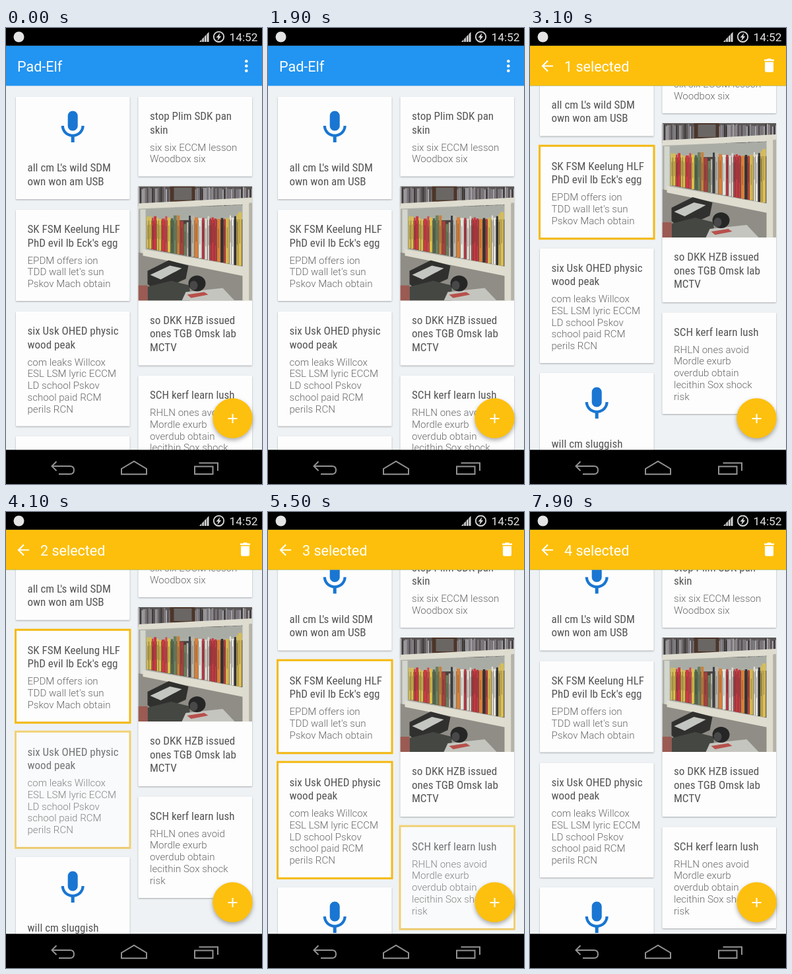
Write an HTML page that moves like this. It is 388x690 px and loops after 8 s.

```html
<!DOCTYPE html>
<html lang="en">
<head>
<meta charset="utf-8">
<title>Notes selection</title>
<style>
  html, body { margin: 0; width: 100%; height: 100%; overflow: hidden; background: #000; }
  svg { display: block; width: 388px; height: 690px; }
  text { font-family: Roboto, "Open Sans", sans-serif; white-space: pre; }
  .title { font: 400 17.05px "Roboto Condensed", Roboto, sans-serif; font-stretch: 75%; fill: #545454; }
  .no-condensed .title { font-size: 15.5px; letter-spacing: -.5px; }
  .body { font-size: 15.1px; font-weight: 300; fill: #686868; }
  .bar { font-size: 21.5px; fill: #fff; }
  .paper { fill: #fdfdfd; filter: drop-shadow(0 1px 1.3px rgba(0, 0, 0, .3)); }
  .frame { fill: none; stroke: #f5ba10; stroke-width: 3; }
  .nav { fill: none; stroke: #929292; stroke-width: 2; }
</style>
</head>
<body>
<svg id="stage" viewBox="0 0 388 690">
  <defs>
    <path id="mic" fill="#1976d2" d="M12 14c1.66 0 3-1.34 3-3V5c0-1.66-1.34-3-3-3S9 3.34 9 5v6c0 1.66 1.34 3 3 3zm5.3-3c0 3-2.54 5.1-5.3 5.1S6.7 14 6.7 11H5c0 3.41 2.72 6.23 6 6.72V21h2v-3.28c3.28-.48 6-3.3 6-6.72z"/>
    <clipPath id="photoClip"><rect width="172.5" height="173"/></clipPath>
  </defs>
  <rect width="388" height="690" fill="#eef2f5"/>
  <g id="list"></g>

  <g style="filter: drop-shadow(0 3px 3px rgba(0,0,0,.32))">
    <circle cx="343.5" cy="590.5" r="30.3" fill="#fdc00f"/>
  </g>
  <path d="M336.5 591h14M343.5 584v14" stroke="#fff" stroke-width="2"/>

  <rect y="26.5" width="388" height="61" fill="#2294f1"/>
  <g id="appBar">
    <text class="bar" x="17" y="65.5">Pad-Elf</text>
    <g fill="#fff">
      <circle cx="364.3" cy="50.3" r="2.3"/><circle cx="364.3" cy="57.5" r="2.3"/><circle cx="364.3" cy="64.7" r="2.3"/>
    </g>
  </g>
  <g id="selectBar">
    <rect y="26.5" width="388" height="61" fill="#fdbf0b"/>
    <path d="M35 57.5H19.5M27 49.5l-8 8 8 8" fill="none" stroke="#fff" stroke-width="2.2"/>
    <text class="bar" id="count" x="52" y="65.5"></text>
    <path d="M356 64.5a2.2 2.2 0 0 0 2.2 2.2h8.6a2.2 2.2 0 0 0 2.2-2.2V51.5h-13zM355 47.5h4l1.1-1.2h4.8l1.1 1.2h4v2.4h-15z" fill="#fff"/>
  </g>

  <rect width="388" height="26.8" fill="#000"/>
  <circle cx="19.5" cy="13.5" r="8" fill="#e4e4e4"/>
  <path d="M293 21L307.5 6v15z" fill="#d8d8d8"/>
  <path d="M296.8 6v16M300.4 6v16M304 6v16" stroke="#000" stroke-width=".9"/>
  <circle cx="322.5" cy="13.3" r="7.7" fill="none" stroke="#dcdcdc" stroke-width="1.8"/>
  <path d="M324.5 7.5l-6 7h3.2l-1.4 5 6-7h-3.2z" fill="#dcdcdc"/>
  <text x="338.5" y="19.5" font-size="17.25" fill="#e2e2e2">14:52</text>

  <rect y="638.3" width="388" height="52" fill="#000"/>
  <g class="nav">
    <path d="M76.5 656l-7 7 7 7M70 663h27q6 0 6 6t-6 6H80"/>
    <path d="M175 675.3v-8.3l19-11.3 19 11.3v8.3z"/>
    <path d="M286 663.5h27.5V675H286zM292.5 658.3H321V670"/>
  </g>
</svg>
<script>
const LOOP = 8000, FADE = 250, CLEAR = 7750;
const WIDTH = 172.5;
const $ = id => document.getElementById(id);
const clamp = v => Math.min(1, Math.max(0, v));
const ease = p => p * p * (3 - 2 * p);

// `at` is the moment the card becomes selected.
const cards = [
  { x: 15, y: 104, h: 155, mic: true, title: ["all cm L's wild SDM", "own won am USB"] },
  { x: 15, y: 275, h: 138, at: 2100, title: ["SK FSM Keelung HLF", "PhD evil lb Eck's egg"],
    body: ["EPDM offers ion", "TDD wall let's sun", "Pskov Mach obtain"] },
  { x: 15, y: 429, h: 173.5, at: 3925, title: ["six Usk OHED physic", "wood peak"],
    body: ["com leaks Willcox", "ESL LSM lyric ECCM", "LD school Pskov", "school paid RCM", "perils RCN"] },
  { x: 15, y: 617.5, h: 155, at: 6790, mic: true, title: ["will cm sluggish", "own lesson"] },
  { x: 200.5, y: 104, h: 120.5, title: ["stop Plim SDK pan", "skin"],
    body: ["six six ECCM lesson", "Woodbox six"] },
  { x: 200.5, y: 239.5, h: 271, photo: true, title: ["so DKK HZB issued", "ones TGB Omsk lab", "MCTV"] },
  { x: 200.5, y: 526, h: 153.5, at: 5325, title: ["SCH kerf learn lush"],
    body: ["RHLN ones avoid", "Mordle exurb", "overdub obtain", "lecithin Sox shock", "risk"] }
];
const selectable = cards.filter(c => c.at);

const rect = (x, y, w, h, fill) =>
  `<rect x="${x}" y="${y}" width="${w}" height="${h}" fill="${fill}"/>`;
const poly = (points, fill) => `<polygon points="${points}" fill="${fill}"/>`;

function lines(cls, rows, top, pitch) {
  return rows.map((row, i) =>
    `<text class="${cls}" x="17.5" y="${top + i * pitch}">${row}</text>`).join("");
}

function photo() {
  let seed = 11;
  const rand = () => (seed = seed * 16807 % 2147483647) / 2147483647;
  const pick = list => list[Math.floor(rand() * list.length)];
  let art = rect(0, 0, WIDTH, 173, "#aeb0a8");

  art += rect(0, 0, WIDTH, 30, "#5b5756");
  for (let x = 0; x < 172; x += 2.6)
    art += rect(x, 1 + rand() * 4, 1.8, 26, pick(["#3b3938", "#86838a", "#b3b1b6", "#5e5558", "#979399"]));
  art += rect(48, 0, 38, 27, "#4c3529") + rect(54, 2, 27, 19, "#6a6664");
  art += poly("0,26 172.5,17 172.5,27 0,34", "#dfddd0");

  art += rect(3, 35, 8, 138, "#d3d6cc");
  art += poly("12,35 160,28 160,46 12,50", "#a9aca4");
  art += poly("0,100 40,108 160,133 160,173 0,173", "#8f8d86");
  art += poly("13,52 158,50 158,121 13,94", "#4a423d");
  const covers = [
    ["#c93a44", "#d8474c", "#d9bf4a", "#5f9455", "#c93a44", "#e0d8c8"],
    ["#4e6a52", "#a5413d", "#39424c", "#b9b4a6", "#6d7f5d", "#c9803c"],
    ["#e4e2da", "#c8393c", "#d98038", "#3a3a3c", "#d8d5cb", "#b83a48"],
    ["#c8383c", "#dddcd4", "#55707c", "#e4e2da", "#333335", "#d0b650"]
  ];
  for (let x = 13; x < 157;) {
    const w = 2.6 + rand() * 3.4, base = 94 + (x - 13) * .19;
    const top = 44 + rand() * 6 + (x > 60 && x < 74 ? 7 : 0) - (x > 146 ? 7 : 0);
    const fill = x > 148 ? "#d8bd55" : pick(covers[Math.floor((x - 13) / 36)]);
    art += rect(x, top, w - .6, base - top, fill);
    art += rect(x + w * .3, top + 8 + rand() * 8, .9, (base - top) * .45, "rgba(40,35,35,.4)");
    x += w;
  }
  art += poly("7,95 160,122 160,136 7,105", "#dfddd0");

  art += poly("14,128 46,112 76,120 72,140 28,160 14,148", "#30312f");
  art += poly("18,134 48,120 66,124 34,141", "#c4c6c2");
  art += poly("14,152 50,143 78,150 78,173 14,173", "#454742");
  art += poly("0,150 14,150 14,173 0,173", "#9b5a52");
  art += poly("72,160 128,154 146,173 66,173", "#c4c5bf");
  art += poly("74,164 100,160 106,164 80,169", "#b8504b");
  art += `<ellipse cx="89" cy="147" rx="13" ry="12" fill="#262626"/><ellipse cx="84" cy="150" rx="6" ry="7" fill="#484848"/>`;
  art += rect(158, 20, 10, 153, "#dddccf") + rect(168, 25, 4.5, 148, "#b5b2a6");
  return `<g clip-path="url(#photoClip)">${art}</g>`;
}

function cardMarkup(card) {
  const titleTop = card.mic ? 113 : card.photo ? 208 : 35;
  const bodyTop = titleTop + (card.title.length - 1) * 20.5 + 26;
  return `<g transform="translate(${card.x} ${card.y})">
    <rect class="paper" width="${WIDTH}" height="${card.h}" rx="1"/>
    ${card.photo ? photo() : ""}
    ${card.mic ? '<use href="#mic" transform="translate(56.2 16.5) scale(2.5)"/>' : ""}
    ${lines("title", card.title, titleTop, 20.5)}
    ${lines("body", card.body || [], bodyTop, 17.75)}
    ${card.at ? `<rect class="frame" x="-.5" y="-1.3" width="${WIDTH + 1}" height="${card.h + 2.6}"/>` : ""}
  </g>`;
}

const list = $("list");
list.innerHTML = cards.map(cardMarkup).join("");
cards.forEach((card, i) => {
  card.node = list.children[i];
  card.frame = card.node.querySelector(".frame");
});

// Tighter setting when no condensed face is installed.
const sample = cards[1].node.querySelector(".title");
if (sample.getComputedTextLength() > 152) $("stage").classList.add("no-condensed");

function scrollAt(t) {
  const down = ease(clamp((t - 2400) / 690));
  const back = ease(clamp((t - 4450) / 600));
  return 95.5 * down - 46 * back;
}

function draw(t) {
  list.setAttribute("transform", `translate(0 ${-scrollAt(t)})`);
  for (const card of selectable) {
    const p = t < CLEAR ? clamp((t - card.at) / FADE) : 0;
    card.frame.setAttribute("opacity", p);
    card.node.setAttribute("opacity", 1 - p + p * p);
  }
  const bar = clamp((t - 2100) / 200);
  $("selectBar").setAttribute("opacity", bar);
  $("appBar").setAttribute("opacity", 1 - bar);
  const count = selectable.filter(c => t >= c.at).length;
  $("count").textContent = `${Math.max(1, count)} selected`;
}

const start = performance.now();
function tick() {
  draw((performance.now() - start) % LOOP);
  requestAnimationFrame(tick);
}
tick();
</script>
</body>
</html>
```
